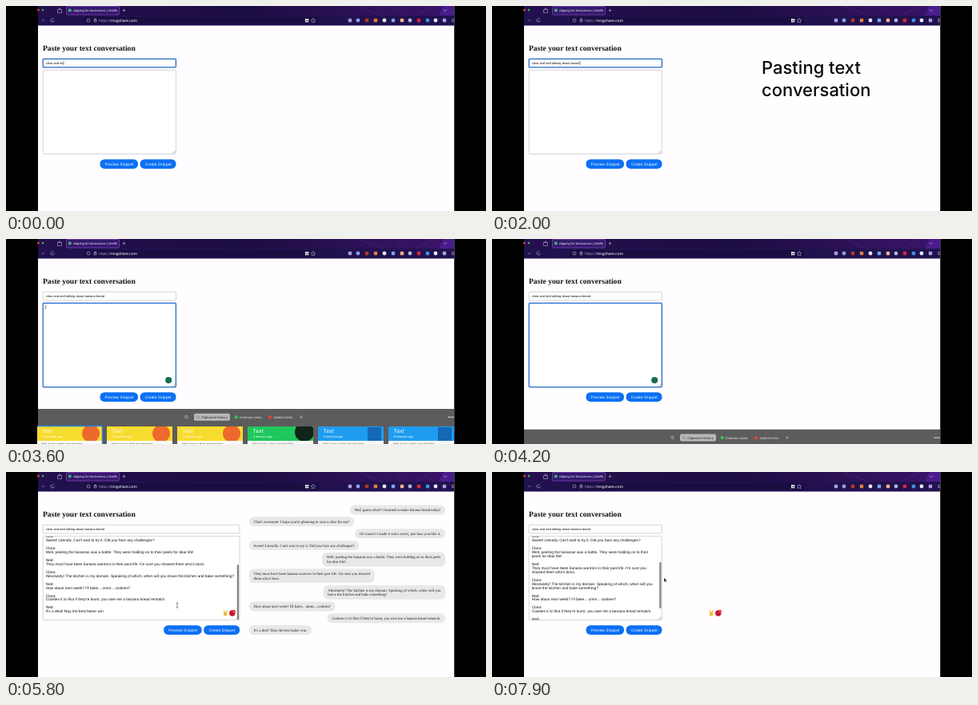
An HTML page that plays this animation: 600x257 px, repeating every 8 s.

```html
<!DOCTYPE html>
<html lang="en">
<head>
<meta charset="utf-8">
<title>Paste a conversation</title>
<style>
html, body { margin: 0; width: 100%; height: 100%; overflow: hidden; background: #000; }
svg { display: block; }
#stage { width: 100vw; height: 100vh; }
text { text-rendering: geometricPrecision; white-space: pre; }
.sans { font-family: "Liberation Sans", Arial, sans-serif; }
.serif { font-family: "Liberation Serif", Times, serif; }
.ui { font-family: Inter, sans-serif; }
</style>
</head>
<body>
<svg id="stage" viewBox="0 0 600 257" xmlns="http://www.w3.org/2000/svg"></svg>
<script>
(() => {
const LOOP = 8000, LINE = 4.95;
const TITLE = 'clara and ned talking about banana bread';
// "|" breaks a line in the narrow box, "/" breaks it in a bubble.
const CHAT = [
  'Ned, guess what? I learned to make banana bread today!',
  "That's awesome! I hope you're planning to save a slice for me?",
  'Of course! I made it extra sweet, just how you like it.',
  "Sweet! Literally. Can't wait to try it. Did you face any challenges?",
  'Well, peeling the bananas was a battle. They were holding on to their |peels /for dear life!',
  "They must have been banana warriors in their past life. I'm sure you |showed /them who's boss.",
  'Absolutely! The kitchen is my domain. Speaking of which, when will you |/brave the kitchen and bake something?',
  "How about next week? I'll bake... umm... cookies?",
  "Cookies it is! But if they're burnt, you owe me a banana bread rematch.",
  "It's a deal! May the best baker win."
];

const rect = (x, y, w, h, fill, extra = '') =>
  `<rect x="${x}" y="${y}" width="${w}" height="${h}" fill="${fill}" ${extra}/>`;
const dot = (x, y, r, fill, extra = '') => `<circle cx="${x}" cy="${y}" r="${r}" fill="${fill}" ${extra}/>`;
const line = (d, stroke, w = .6, extra = '') =>
  `<path d="${d}" fill="none" stroke="${stroke}" stroke-width="${w}" ${extra}/>`;
const label = (x, y, size, str, cls = 'sans', extra = '') =>
  `<text x="${x}" y="${y}" font-size="${size}" class="${cls}" ${extra}>${str}</text>`;

function browser() {
  const icons = [
    [430, '#a99de0'], [440, '#8f9df0'], [451, '#b3362c'], [462, '#e0813a'], [473, '#e8e6f4'],
    [484, '#6fa9e8'], [495, '#efb089'], [505, '#b8b4d8'], [516, '#d8283c'], [527, '#3f8fe0'],
    [537, '#e6ecfa'], [548, '#a99de0']
  ];
  return rect(40, 0, 520, 12.5, 'url(#bar)') + rect(40, 12, 520, 12.5, '#21124f') +
    '<path d="M541 12L547 0H560V12z" fill="#4a1c8c"/>' +
    line('M440 0L470 12M486 0L500 12M512 12L534 0', '#5a2590', .8, 'opacity=".6"') +
    dot(40.5, 5, 1.3, '#f0524a') + dot(46, 5, 1.3, '#35c04a') +
    line('M64.500 4.500h5v4h-5zM66 4.500v-1.500h2v1.500', '#b9a6e0', .6) +
    rect(75.5, .5, 66, 10.5, '#35196b', 'rx="1.500" stroke="#8a45c8" stroke-width=".7"') +
    rect(78, 3.6, 3.6, 3.6, '#3fae72') +
    label(84, 7.2, 4.1, 'clipping for textconvos | chat.s', 'sans', 'fill="#f0eaff"') +
    line('M135.300 4l2.400 2.400m0-2.400l-2.400 2.400M147.500 3.500v4m-2-2h4', '#d9cdf2', .5) +
    line('M547 4.500l2 2 2-2', '#d9cdf2', .6) +
    line('M49 18h-4m1.500-1.600L45 18l1.500 1.600', '#6d60a0') +
    line('M60 18a2 2 0 1 1-.7-1.600', '#c9c0ea') +
    rect(97, 13.8, 294, 8.6, '#1a0d42', 'rx="1.500"') +
    dot(103, 18, 2, 'none', 'stroke="#c9c0ea" stroke-width=".6"') +
    line('M110 17.500h3v2.300h-3zM110.500 17.500v-1.500h2v1.500', '#c9c0ea') +
    label(116, 19.7, 5, '<tspan fill="#9d92c6">https://</tspan>msgshare.com', 'sans', 'fill="#fff"') +
    rect(374, 16, 1.9, 1.9, '#fff') + rect(376.4, 16, 1.9, 1.9, '#fff') +
    rect(374, 18.4, 1.9, 1.9, '#fff') + rect(376.4, 18.4, 1.9, 1.9, '#fff') +
    line('M384 15.300l.9 1.900 2 .2-1.500 1.400.4 2-1.800-1-1.800 1 .4-2-1.500-1.400 2-.2z', '#d9cdf2', .5) +
    icons.map(([x, c], i) => i % 3 === 1 ? dot(x, 18, 2.4, c) : rect(x - 2.2, 15.8, 4.4, 4.4, c, 'rx="1"')).join('') +
    line('M557 16.500h3M557 18h3M557 19.500h3', '#d9cdf2', .5);
}

function button(id, x, w, str, tx) {
  return rect(x, 192.2, w, 11.8, '#0b70f4', `id="${id}" rx="5.600"`) +
    label(tx, 199.9, 4.7, str, 'ui', 'fill="#fff"');
}

const COLORS = ['#f7dc30', '#f7dc30', '#f7dc30', '#1fc75c', '#1f9cf0', '#1f9cf0'];
const AGES = ['3 seconds ago', '2 minutes ago', '3 minutes ago', '4 minutes ago', '6 minutes ago', '8 minutes ago'];

function card(color, i) {
  const x = 38 + i * 88;
  const mark = i < 3 ? dot(x + 68, 244, 11, '#ee6a2c')
    : i === 3 ? dot(x + 71, 242, 12, '#10241a')
    : rect(x + 62, 236, 17, 17, '#1468b4');
  return `<svg x="${x}" y="235" width="82" height="22" viewBox="${x} 235 82 22">` +
    rect(x, 235, 82, 18, color) + mark + rect(x, 253, 82, 10, '#fafafa') +
    label(x + 6.5, 243.3, 6.6, 'Text', 'ui', 'fill="#fff"') +
    label(x + 6.5, 248.6, 3.7, AGES[i], 'ui', 'fill="#fff"') +
    label(x + 6, 257.5, 3.6, 'Ned: It was a deal, may the best', 'sans', 'fill="#333"') + '</svg>';
}

function panel() {
  const white = 'fill="#f3f3f3"';
  return rect(40, 213, 520, 60, '#5c5c5c') +
    dot(225.3, 222.8, 1.5, 'none', 'stroke="#ddd" stroke-width=".6"') + line('M226.400 224l1.300 1.300', '#ddd') +
    rect(235, 218.8, 45, 9, '#b9b9b9', 'rx="2"') +
    dot(239.8, 223.3, 1.7, 'none', 'stroke="#666" stroke-width=".5"') +
    label(244, 224.9, 4, 'Clipboard History', 'ui', 'fill="#222"') +
    dot(287.7, 223.3, 2.1, '#35c85a') + label(291.5, 224.9, 4, 'Common Links', 'ui', white) +
    dot(330, 223.3, 2.1, '#ee4038') + label(334.5, 224.9, 4, 'Useful Links', 'ui', white) +
    line('M369 221.500v3.600m-1.800-1.800h3.600', '#ddd', .5) +
    dot(553.6, 223.3, .9, '#eee') + dot(556.2, 223.3, .9, '#eee') + dot(558.8, 223.3, .9, '#eee') +
    COLORS.map(card).join('') +
    rect(37.5, 234.5, 83, 40, 'none', 'id="pick" stroke="#2583e4" stroke-width="1.400" rx="1"');
}

function transcript(wide) {
  const lines = CHAT.flatMap((msg, i) => [
    i % 2 ? 'Ned:' : 'Clara:',
    ...(wide ? [msg.replace(/[|\/]/g, '')] : msg.replace('/', '').split('|')),
    ''
  ]);
  return lines.map((s, i) => s && label(49.7, (25.7 + i * LINE).toFixed(2), 4.77, s, 'sans', 'fill="#111"')).join('');
}

const HAND = line('M-1-3v5m0-2l-1.500-1v2l2 3h3l1-3v-2.500l-3.500-1', '#eee', .9);
const IBEAM = line('M-1.200-3h2.400M0-3v6M-1.200 3h2.400', '#333', .6);
const ARROW = '<path d="M0-2.500v5.300l1.200-1.100.9 1.900.8-.4-.9-1.800h1.700z" fill="#111" stroke="#fff" stroke-width=".3"/>';
const BADGE = dot(0, 0, 3.7, '#c8172f') + dot(2.2, -2.2, 2, '#e0283c') +
  label(1.3, -1, 3, '4', 'sans', 'fill="#fff"');
const FINGERS = line('M-1.500-3l1 3M2-3l-1.300 3', '#f3b72c', 1.3, 'stroke-linecap="round"') +
  rect(-2, -.8, 4.2, 4, '#f3b72c', 'rx="1.500"');

const stage = document.getElementById('stage');
stage.innerHTML = `<defs>
  <linearGradient id="bar"><stop offset="0" stop-color="#24104e"/><stop offset=".5" stop-color="#1c0d42"/>
  <stop offset="1" stop-color="#3b1468"/></linearGradient>
  <clipPath id="screen"><rect x="39" width="521.500" height="257"/></clipPath>
  <clipPath id="inner"><rect x="46" y="80.800" width="246" height="104.600"/></clipPath></defs>
<g clip-path="url(#screen)">
${rect(40, 0, 520.5, 257, '#fffdff')}${browser()}
${label(46, 56.2, 9.6, 'Paste your text conversation', 'serif', 'font-weight="700" fill="#111"')}
${rect(46.2, 66.3, 166.2, 10.6, '#fff', 'id="field" rx="1"')}
${label(49.7, 72.9, 3.98, '', 'sans', 'id="typed" fill="#111"')}
${rect(0, 69.2, .5, 4.8, '#111', 'id="caret"')}
${rect(46.2, 80.4, 166.2, 105.2, '#fff', 'id="area" rx="1"')}
<g clip-path="url(#inner)"><g id="narrow">${transcript(false)}</g><g id="wide">${transcript(true)}</g></g>
${rect(49.6, 83, .5, 5, '#111', 'id="caret2"')}
${rect(0, 0, 2.3, 58, '#858585', 'id="thumb" rx="1.100"')}
<g id="corner">${line('M208.300 184.700l3.300-3.300M210.200 184.700l1.400-1.400', '#777', .5)}
${button('preview', 117.5, 47.5, 'Preview Snippet', 123.6)}${button('create', 167.6, 44.9, 'Create Snippet', 173.8)}</g>
${dot(203.2, 177, 4, '#176b52', 'id="helper"')}
<g id="badge">${BADGE}</g><g id="fingers" transform="translate(274 177)">${FINGERS}</g>
<g id="bubbles"></g>
<g id="caption" font-weight="500" fill="#0b0b0b">${label(337, 85, 22, 'Pasting text', 'ui')}${label(337, 113, 22, 'conversation', 'ui')}</g>
<g id="panel">${panel()}</g>
<g id="pointer"><g id="hand">${HAND}</g><g id="ibeam">${IBEAM}</g><g id="arrow">${ARROW}</g></g>
</g>`;

const el = {};
stage.querySelectorAll('[id]').forEach(n => el[n.id] = n);
const show = (n, on) => n.style.display = on ? '' : 'none';
const set = (n, attrs) => { for (const k in attrs) n.setAttribute(k, attrs[k]); };
const move = (n, x, y) => n.setAttribute('transform', `translate(${x} ${y})`);

// Bubbles hug their text: even messages on the right, odd on the left.
let bubbleY = 41.5;
CHAT.forEach((msg, i) => {
  const rows = msg.replace('|', '').split('/');
  const g = document.createElementNS(stage.namespaceURI, 'g');
  el.bubbles.append(g);
  g.innerHTML = rows.map((s, k) =>
    label(0, (bubbleY + 7.6 + k * 5.6).toFixed(2), 4.77, s.trim(), 'serif', 'fill="#1a1a1a"')).join('');
  const texts = [...g.children];
  const w = Math.max(...texts.map(t => t.getComputedTextLength())) + 11.6;
  const x = i % 2 ? 303.8 : 549.2 - w;
  texts.forEach(t => t.setAttribute('x', x + 5.8));
  const h = rows.length > 1 ? 17.8 : 12;
  g.insertAdjacentHTML('afterbegin', rect(x, bubbleY, w, h, '#e8e8ea', 'rx="5.800"'));
  bubbleY += h + 2.8;
});

const ease = p => p * p * (3 - 2 * p);
function track(keys, t) {
  let i = 0;
  while (i < keys.length - 2 && t >= keys[i + 1][0]) i++;
  const [a, b] = [keys[i], keys[i + 1]];
  const p = ease(Math.min(1, Math.max(0, (t - a[0]) / (b[0] - a[0]))));
  return a.slice(1).map((v, k) => v + (b[k + 1] - v) * p);
}

const CAPTION = [[900, 0], [1300, 1], [3000, 1], [3300, 0]];
const PANEL = [[3250, 48], [3550, 0], [4070, 0], [4320, 48]];
const MOUSE = [[4550, 175, 165], [4900, 148, 199], [5350, 148, 199], [5750, 214, 167], [7200, 214, 167], [7700, 215, 135]];
const FOCUS = 2900, PASTE = 4500, PRESS = 4850, OPEN = 5350, CLOSE = 7600;

function draw(t) {
  const open = t >= OPEN && t < CLOSE, pasted = t >= PASTE;
  const grow = open ? 79.6 : 0;
  const inArea = t >= FOCUS && t < PRESS;
  const blink = Math.floor(t / 600) % 2 === 0;
  const count = Math.min(TITLE.length, 12 + Math.floor(t * 21 / 2000));

  el.typed.textContent = TITLE.slice(0, count);
  el.caret.setAttribute('x', 49.9 + el.typed.getComputedTextLength());
  show(el.caret, t < FOCUS && (count < TITLE.length || blink));
  show(el.caret2, inArea && !pasted && blink);

  const edge = on => ({ width: 166.2 + grow, stroke: on ? '#2468c8' : '#b9b9bd', 'stroke-width': on ? 1.3 : .6 });
  set(el.field, edge(t < FOCUS));
  set(el.area, edge(inArea));
  move(el.corner, grow, 0);
  el.preview.setAttribute('fill', t >= PRESS && t < OPEN ? '#234296' : '#0b70f4');

  show(el.narrow, pasted && !open);
  show(el.wide, open);
  move(el.narrow, 0, t >= OPEN ? 12 : 0);
  move(el.wide, 0, 12);
  show(el.thumb, pasted);
  set(el.thumb, { x: 209.2 + grow, y: open ? 116 : t < OPEN ? 121 : 113, height: open ? 69 : 58 });

  show(el.helper, inArea && !pasted);
  show(el.badge, pasted);
  move(el.badge, t >= OPEN ? 282.8 : 203, 177);
  show(el.fingers, t >= OPEN);
  show(el.bubbles, open);

  el.caption.setAttribute('opacity', track(CAPTION, t)[0]);
  const drop = track(PANEL, t)[0];
  show(el.panel, drop < 47.9);
  move(el.panel, 0, drop);
  move(el.pick, t < 3850 ? 0 : 88, 0);

  const [x, y] = track(MOUSE, t);
  show(el.pointer, t >= 4550);
  move(el.pointer, x, y);
  const onButton = y > 192 && y < 204;
  const onText = !onButton && y < 186 && x < 212.5 + grow;
  show(el.hand, onButton);
  show(el.ibeam, onText);
  show(el.arrow, !onButton && !onText);
}

const start = performance.now();
function tick() {
  draw((performance.now() - start) % LOOP);
  requestAnimationFrame(tick);
}
tick();
})();
</script>
</body>
</html>
```
